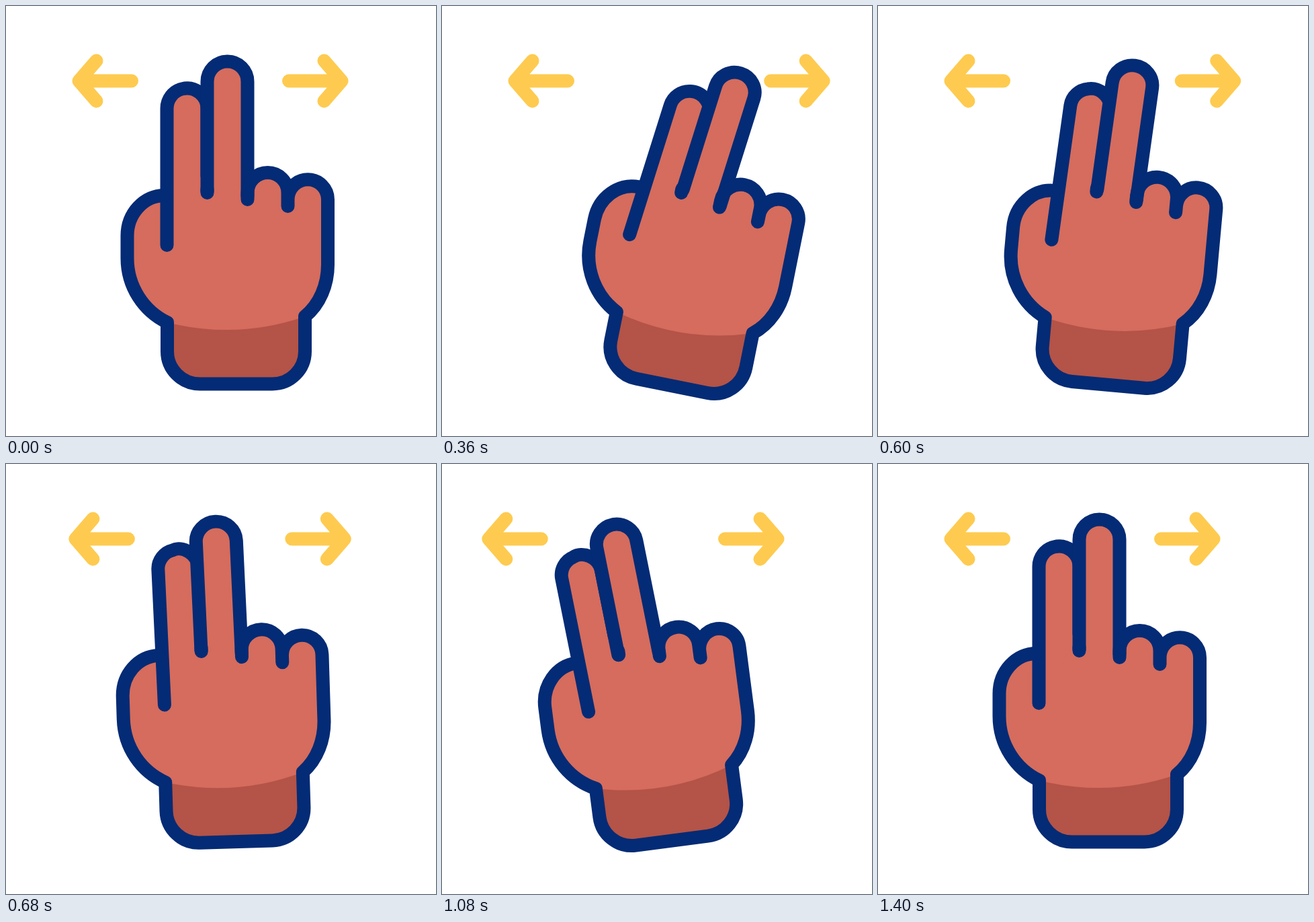
Write an HTML page that moves like this. It is 640x640 px and loops after 1.48 s.

```html
<!DOCTYPE html>
<html lang="en">
<head>
<meta charset="utf-8">
<title>Two-finger swipe</title>
<style>
  @property --f { syntax: "<number>"; inherits: true; initial-value: 0; }

  html, body { margin: 0; width: 100%; height: 100%; overflow: hidden; background: #fff; }

  /* --f counts ticks of 40 ms */
  body { animation: tick 1480ms steps(37) -6ms infinite; }
  @keyframes tick { from { --f: 0; } to { --f: 37; } }

  svg {
    display: block;
    width: 100%;
    height: 100%;

    /* progress of each phase */
    --u1: clamp(0, (var(--f) - 2) / 9, 1);
    --u2: clamp(0, (var(--f) - 11) / 7, 1);
    --u3: clamp(0, (var(--f) - 11) / 11, 1);
    --u4: clamp(0, (var(--f) - 16) / 6, 1);
    --u5: clamp(0, (var(--f) - 22) / 11, 1);

    /* eased in and out */
    --lean: calc(var(--u1) * var(--u1) * (3 - 2 * var(--u1)));
    --right-back: calc(var(--u2) * var(--u2) * (3 - 2 * var(--u2)));
    --swing: calc(var(--u3) * var(--u3) * (3 - 2 * var(--u3)));
    --left-out: calc(var(--u4) * var(--u4) * (3 - 2 * var(--u4)));
    --rest: calc(var(--u5) * var(--u5) * (3 - 2 * var(--u5)));

    --tilt: calc(var(--lean) - 2 * var(--swing) + var(--rest));
    --bend: calc(var(--lean) - var(--rest));
  }

  .line, .finger, .arrow {
    fill: none;
    stroke: #042b75;
    stroke-width: 20;
    stroke-linecap: round;
    stroke-linejoin: round;
  }
  .arrow { stroke: #fecb50; }
  .skin, .finger { fill: #d56c5d; }
  .wrist { fill: #b45347; }

  .to-left { transform: translateX(calc((var(--rest) - var(--left-out)) * 69px)); }
  .to-right { transform: translateX(calc((var(--lean) - var(--right-back)) * 78px)); }

  .hand { transform-origin: 328px 563px; transform: rotate(calc(var(--tilt) * 13deg)); }

  /* bent fingers look slightly shorter */
  .index {
    transform-origin: 250px 308px;
    transform: translateX(calc(var(--bend) * 2px)) rotate(calc(var(--tilt) * 7deg)) scaleY(calc(1 - var(--bend) * .009));
  }
  .middle {
    transform-origin: 329px 288px;
    transform: rotate(calc(var(--tilt) * 7deg)) scaleY(calc(1 - var(--bend) * .014));
  }

  /* the index fingertip dents a little on the left swing */
  .tip { animation: dent 1480ms cubic-bezier(.33, 0, .67, 1) infinite; }
  @keyframes dent {
    0%, 29.73%, 89.19%, 100% {
      d: path("M-30 203.5L-30 0C-30 -13.8 -20.7 -25.8 -7.3 -29.1C11.6 -33.8 30 -19.5 30 0L30 100");
    }
    59.46% {
      d: path("M-30 203.5L-30 0C-30 -13 -19 -25.5 -7 -27C5 -35 30 -22 30 0L30 100");
    }
  }
</style>
</head>
<body>
<svg viewBox="0 0 640 640">
  <defs>
    <path id="arrow" class="arrow" d="M187 111.5H108.5M134.5 81.5L108.5 111.5L134.5 141.5"/>
  </defs>

  <g class="to-left"><use href="#arrow"/></g>
  <g class="to-right"><use href="#arrow" transform="matrix(-1 0 0 1 608 0)"/></g>

  <g class="hand">
    <path class="wrist" d="M240 440V514A48.5 48.5 0 0 0 288.5 562.5H396.5A48.5 48.5 0 0 0 445 514V440Z"/>
    <path class="skin" d="M236 282C205 282 180.5 309 180.5 342V375C180.5 418 205 454 240 471
      Q345 497 445 462C467 444 479 415 479 385V288A29.75 29.75 0 0 0 419.5 288V278A30 30 0 0 0 359.5 278V288
      L345 245H262Z"/>

    <g class="index">
      <g transform="translate(269.5 152.5)">
        <path class="finger tip" d="M-30 203.5L-30 0C-30 -13.8 -20.7 -25.8 -7.3 -29.1C11.6 -33.8 30 -19.5 30 0L30 100"/>
      </g>
    </g>
    <g class="middle">
      <path class="finger" d="M299.5 276V112.5A30 30 0 0 1 359.5 112.5V283"/>
    </g>

    <path class="line" d="M236 282C205 282 180.5 309 180.5 342V375C180.5 418 205 454 240 471
      V514A48.5 48.5 0 0 0 288.5 562.5H396.5A48.5 48.5 0 0 0 445 514V462
      C467 444 479 415 479 385V288A29.75 29.75 0 0 0 419.5 288V298V278A30 30 0 0 0 359.5 278V288
      M299.5 272V278"/>
  </g>
</svg>
</body>
</html>
```
